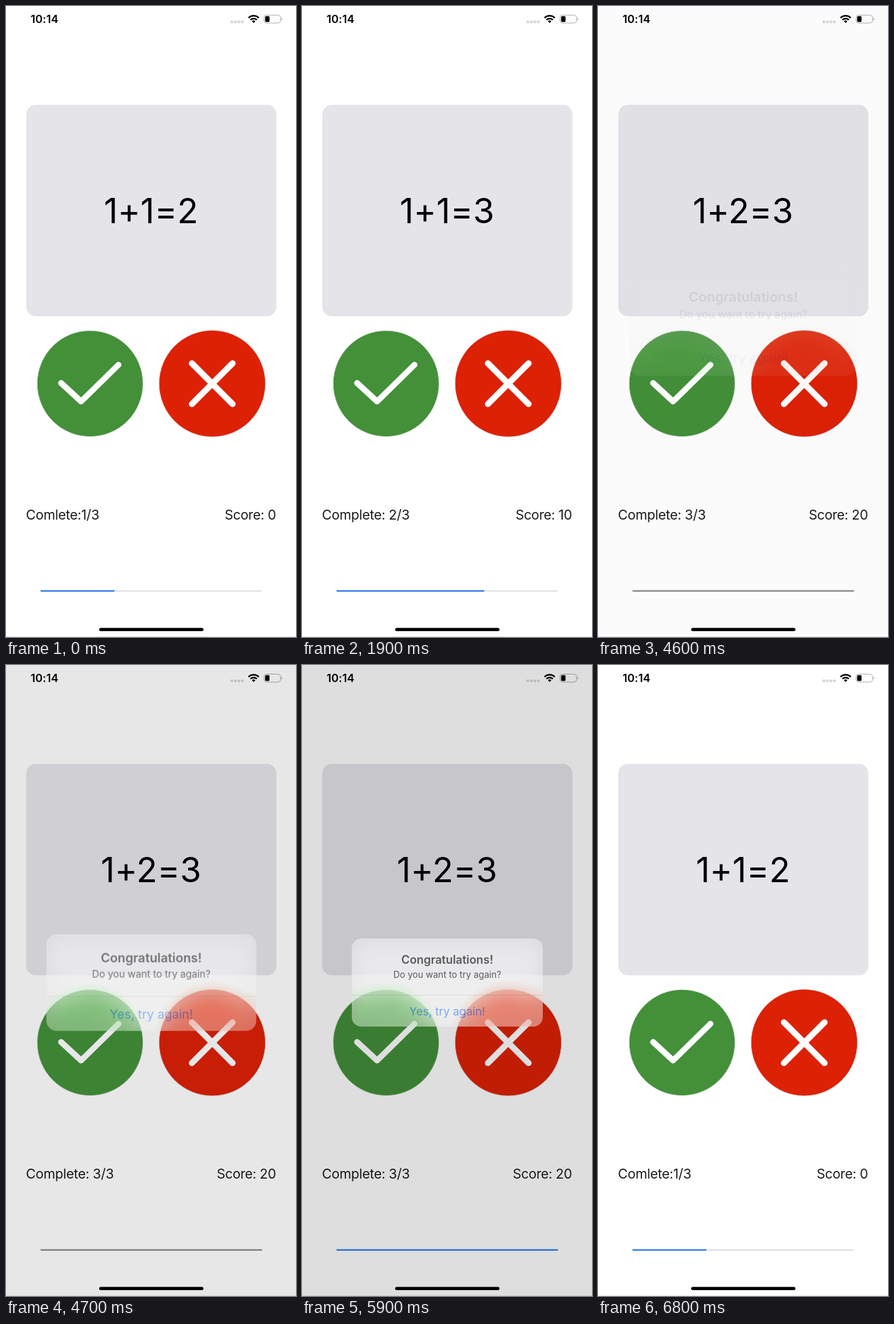
An HTML page that plays this animation: 495x1075 px, repeating every 7000 ms.

```html
<!DOCTYPE html>
<html lang="en">
<head>
<meta charset="utf-8">
<title>Quiz</title>
<style>
html, body { margin: 0; width: 100%; height: 100%; overflow: hidden; background: #fff; }
body { position: relative; font-family: Inter, Roboto, sans-serif; font-feature-settings: "calt" 0; }
.screen, .dim { position: absolute; left: 0; top: 0; width: 495px; height: 1075px; }
.screen *, .dim, .alert { animation: 7s infinite; }

.question { font-size: 58.7px; text-anchor: middle; }
.label { font-size: 23px; letter-spacing: -.35px; fill: #1c1c1e; }
.end { font-size: 22.8px; text-anchor: end; }
.clock { font-size: 19px; font-weight: 600; }
.mark { fill: none; stroke: #fff; stroke-linecap: round; stroke-linejoin: round; }

/* One group per question */
.step { animation-timing-function: step-end; opacity: 0; }
.first { animation-name: first; }
.second { animation-name: second; }
.third { animation-name: third; }
@keyframes first { 0% { opacity: 1 } 11.429% { opacity: 0 } 88.571%, 100% { opacity: 1 } }
@keyframes second { 0% { opacity: 0 } 11.429% { opacity: 1 } 44.286%, 100% { opacity: 0 } }
@keyframes third { 0% { opacity: 0 } 44.286% { opacity: 1 } 88.571%, 100% { opacity: 0 } }

.yes { fill: #439039; animation-name: press; animation-timing-function: linear; }
@keyframes press {
  0%, 8.56%, 12.857%, 38.56%, 45.714%, 54.27%, 60%, 100% { fill: #439039 }
  8.571%, 11.429%, 38.571%, 44.286%, 54.286%, 58.571% { fill: #255220 }
}

.bar { transform-origin: 59px 0; animation-name: fill, tint; animation-timing-function: ease-in-out, linear; }
@keyframes fill {
  0%, 11.429% { transform: scaleX(.3333) }
  15.714%, 44.286% { transform: scaleX(.6667) }
  48.571%, 88.571% { transform: scaleX(1) }
  92.143%, 100% { transform: scaleX(.3333) }
}
@keyframes tint {
  0%, 62%, 84%, 100% { fill: #3c84f0 }
  65%, 81.429% { fill: #929296 }
}

.dim { background: #000; opacity: 0; animation-name: dim; animation-timing-function: linear; }
@keyframes dim {
  0%, 64.286% { opacity: 0 }
  65.714% { opacity: .014 }
  67.143% { opacity: .095 }
  68.571% { opacity: .155 }
  70% { opacity: .18 }
  72.857%, 81.429% { opacity: .188 }
  82.857% { opacity: .175 }
  84.286% { opacity: .13 }
  85.714% { opacity: .065 }
  87.143% { opacity: .02 }
  88.571%, 100% { opacity: 0 }
}

.alert {
  position: absolute; left: 85px; top: 466px; width: 326px; height: 150px;
  border-radius: 16px; overflow: hidden; opacity: 0;
  background: rgba(233, 233, 236, .78);
  backdrop-filter: blur(20px) brightness(1.4) saturate(1.4);
  animation-name: alert; animation-timing-function: linear;
}
.alert svg { display: block; }
.alert text { text-anchor: middle; }
@keyframes alert {
  0%, 64.286% { opacity: 0; transform: scale(1.2) }
  65.714% { opacity: .08; transform: scale(1.19) }
  67.143% { opacity: .5; transform: scale(1.1) }
  68.571% { opacity: .82; transform: scale(1.04) }
  70% { opacity: .95; transform: scale(1.01) }
  72.857%, 81.429% { opacity: 1; transform: none }
  82.857% { opacity: .92; transform: none }
  84.286% { opacity: .62; transform: none }
  85.714% { opacity: .33; transform: none }
  87.143% { opacity: .1; transform: none }
  88.571%, 100% { opacity: 0; transform: none }
}
</style>
</head>
<body>
<svg class="screen" viewBox="0 0 495 1075">
  <!-- Status bar -->
  <text class="clock" x="42" y="29">10:14</text>
  <g fill="#e2e2e2" stroke="#c4c4c4">
    <circle cx="385.5" cy="27" r="1.8"/><circle cx="391.5" cy="27" r="1.8"/>
    <circle cx="397.5" cy="27" r="1.8"/><circle cx="403.5" cy="27" r="1.8"/>
  </g>
  <g fill="none" stroke="#000" stroke-width="2.6">
    <path d="M414 20.2a12.4 12.4 0 0 1 17.4 0M417.2 23.6a7.8 7.8 0 0 1 11 0"/>
    <path d="M422.7 29l-2.9-3a4.2 4.2 0 0 1 5.8 0z" fill="#000" stroke="none"/>
  </g>
  <rect x="440.5" y="15.5" width="28" height="13.5" rx="4" fill="none" stroke="#a6a6a6"/>
  <rect x="442.3" y="17.3" width="7.5" height="10" rx="1.8"/>
  <path d="M470 20v4.6q1.6-.6 1.6-2.3t-1.6-2.3z" fill="#a6a6a6"/>

  <rect x="34.5" y="168.5" width="427" height="360" rx="16" fill="#e5e4e9"/>

  <!-- Answer buttons -->
  <circle class="yes" cx="143.5" cy="643.3" r="90.3" stroke="#d5dcd5"/>
  <path class="mark" d="M94 642.3l34.2 31.5L192 611.2" stroke-width="10"/>
  <circle cx="352" cy="643.3" r="90.8" fill="#dd2105" stroke="#dcd3d3"/>
  <path class="mark" d="M317.3 608.7l69.4 69.4m0-69.4l-69.4 69.4" stroke-width="10.5"/>

  <g class="step first">
    <text class="question" x="247.5" y="370">1+1=2</text>
    <text class="label" x="34" y="875">Comlete:1/3</text>
    <text class="label end" x="460.7" y="875">Score: 0</text>
  </g>
  <g class="step second">
    <text class="question" x="247.5" y="370">1+1=3</text>
    <text class="label" x="34" y="875">Complete: 2/3</text>
    <text class="label end" x="460.7" y="875">Score: 10</text>
  </g>
  <g class="step third">
    <text class="question" x="247.5" y="370">1+2=3</text>
    <text class="label" x="34" y="875">Complete: 3/3</text>
    <text class="label end" x="460.7" y="875">Score: 20</text>
  </g>

  <rect x="59" y="995.2" width="378" height="2.7" rx="1" fill="#e4e4e6"/>
  <rect class="bar" x="59" y="995.2" width="378" height="2.7"/>
  <rect x="159" y="1059.5" width="178" height="5.5" rx="2.75"/>
  <rect y="1074" width="495" height="1" fill="#e9e9e9"/>
</svg>

<div class="dim"></div>

<div class="alert">
  <svg width="326" height="150">
    <text x="163" y="43.5" font-size="19.5" font-weight="600">Congratulations!</text>
    <text x="163" y="67.5" font-size="15.3">Do you want to try again?</text>
    <rect y="96" width="326" height="1" fill="#3c3c43" fill-opacity=".2"/>
    <text x="163" y="131" font-size="19.3" fill="#2f7df2">Yes, try again!</text>
  </svg>
</div>
</body>
</html>
```
